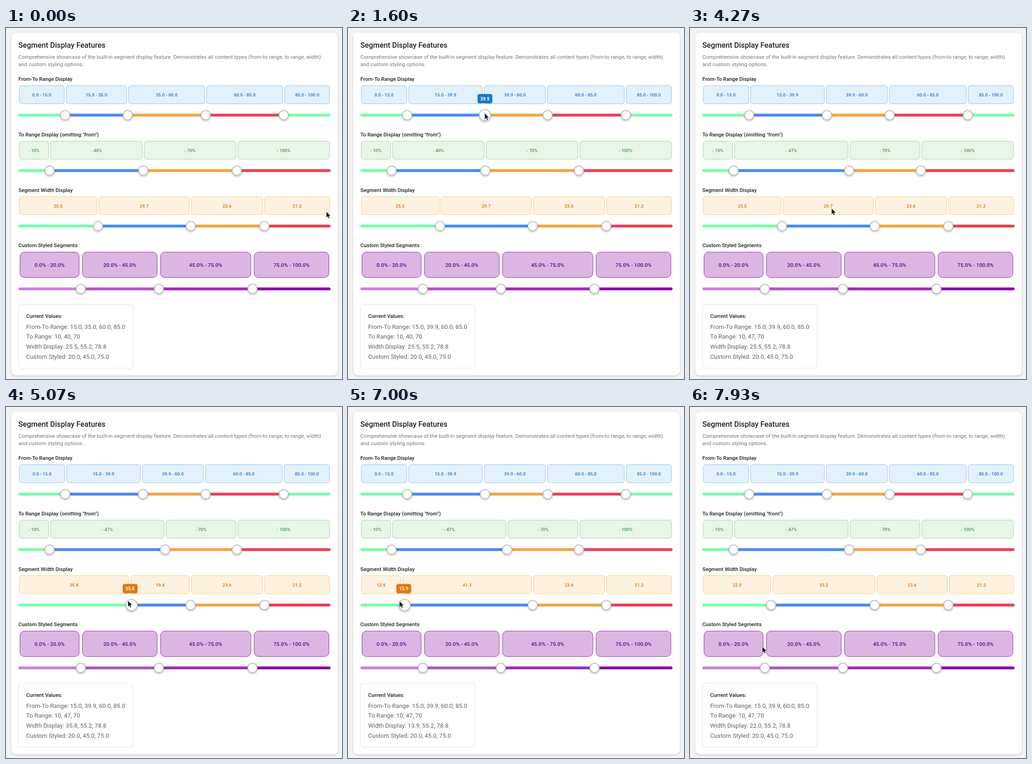
Recreate the animation shown at these times as an HTML page with a canvas. Size 733 by 764 pixels, loop 8 s.

```html
<!DOCTYPE html>
<html lang="en">
<head>
<meta charset="utf-8">
<title>Segment Display Features</title>
<style>
html, body { margin: 0; width: 100%; height: 100%; overflow: hidden; background: #f3f3f3; }
canvas { display: block; width: 733px; height: 764px; }
</style>
</head>
<body>
<canvas id="stage"></canvas>
<script>
const W = 733, H = 764, LOOP = 8000, LEFT = 27, SPAN = 681;
const THUMB_LAG = 6, CURSOR_LEAD = 35;
const canvas = document.getElementById('stage');
const ctx = canvas.getContext('2d');
const dpr = window.devicePixelRatio || 1;
canvas.width = W * dpr;
canvas.height = H * dpr;

const RAINBOW = ['#79fdad', '#4a8af4', '#f3a645', '#ec4058'];
const PURPLES = ['#c885d6', '#ad59c0', '#a02fb6', '#8b0ea2'];
const fixed = v => v.toFixed(1);
const toX = v => LEFT + v / 100 * SPAN;
const lerp = (a, b, u) => a + (b - a) * u;
const ease = (t, from, to) => {
  const u = Math.min(1, Math.max(0, (t - from) / (to - from)));
  return (1 - Math.cos(Math.PI * u)) / 2;
};

// `moving` is the index of the thumb that changes, `steps` its moves as {from, to, value}.
const sliders = [
  { title: 'From-To Range Display', name: 'From-To Range', digits: 1,
    values: [15, 35, 60, 85], moving: 1, steps: [{ from: 1070, to: 1530, value: 39.9 }],
    label: (a, b) => fixed(a) + ' - ' + fixed(b), colors: RAINBOW,
    fill: '#e3f1fb', edge: '#90c3ea', ink: '#2673c4', tip: '#1976d2' },
  { title: 'To Range Display (omitting "from")', name: 'To Range', digits: 0,
    values: [10, 40, 70], moving: 1, steps: [{ from: 3400, to: 3510, value: 47 }],
    label: (a, b) => '- ' + b + '%', colors: RAINBOW,
    fill: '#e8f5e8', edge: '#a3d4a6', ink: '#45974a' },
  { title: 'Segment Width Display', name: 'Width Display', digits: 1,
    values: [25.5, 55.2, 78.8], moving: 0, steps: [
      { from: 4670, to: 4930, value: 42 },
      { from: 4930, to: 5200, value: 30.5 },
      { from: 5400, to: 5670, value: 18.8 },
      { from: 6870, to: 7090, value: 11.2 },
      { from: 7130, to: 7600, value: 22 }],
    label: (a, b) => fixed(b - a), colors: RAINBOW,
    fill: '#fdf2df', edge: '#f1cc88', ink: '#dd6a12', tip: '#e8750c' },
  { title: 'Custom Styled Segments', name: 'Custom Styled', digits: 1,
    values: [20, 45, 75], moving: 0, steps: [], custom: true,
    label: (a, b) => fixed(a) + '% - ' + fixed(b) + '%', colors: PURPLES,
    fill: '#dcb6e3', edge: '#9527ad', ink: '#4a148c' }
];

// The cursor either travels to x, y or drags a slider's thumb.
const moves = [
  { from: 70, to: 730, x: 265, y: 186 },
  { from: 1070, to: 1730, drag: sliders[0] },
  { from: 1730, to: 2470, x: 221, y: 309 },
  { from: 2870, to: 3070, x: 349, y: 308 },
  { from: 4000, to: 4270, x: 309, y: 393 },
  { from: 4270, to: 4530, x: 211, y: 422 },
  { from: 4670, to: 5925, drag: sliders[2] },
  { from: 5760, to: 6070, x: 97, y: 433 },
  { from: 6270, to: 6730, x: 157, y: 423 },
  { from: 6870, to: 7710, drag: sliders[2] },
  { from: 7710, to: 7920, x: 158, y: 522 }
];

function valueAt(s, t) {
  return s.steps.reduce((v, m) => lerp(v, m.value, ease(t, m.from, m.to)), s.values[s.moving]);
}

function valuesAt(s, t) {
  return s.values.map((v, i) => i === s.moving ? valueAt(s, t) : v);
}

function cursorAt(t) {
  let x = 699, y = 400;
  for (const m of moves) {
    if (t < m.from) break;
    if (m.drag) {
      const now = valueAt(m.drag, Math.min(t + CURSOR_LEAD, m.to));
      x += toX(now) - toX(valueAt(m.drag, m.from));
    } else {
      const e = ease(t, m.from, m.to);
      x = lerp(x, m.x, e);
      y = lerp(y, m.y, e);
    }
  }
  return [x, y];
}

function text(str, x, y, size, color, weight = 400, align = 'left') {
  ctx.font = `${weight} ${size}px Roboto, sans-serif`;
  ctx.textAlign = align;
  ctx.fillStyle = color;
  ctx.fillText(str, x, y);
}

function box(x, y, w, h, r, fill, edge) {
  ctx.beginPath();
  ctx.roundRect(x, y, w, h, r);
  ctx.fillStyle = fill;
  ctx.fill();
  if (edge) {
    ctx.strokeStyle = edge;
    ctx.lineWidth = 1;
    ctx.stroke();
  }
}

function withShadow(alpha, blur, dy, paint) {
  ctx.save();
  ctx.shadowColor = `rgba(0,0,0,${alpha})`;
  ctx.shadowBlur = blur * dpr;
  ctx.shadowOffsetY = dy * dpr;
  paint();
  ctx.restore();
}

function disc(x, y, r, color) {
  ctx.beginPath();
  ctx.arc(x, y, r, 0, 2 * Math.PI);
  ctx.fillStyle = color;
  ctx.fill();
}

function thumb(x, y, grow) {
  const r = 11 + 2.3 * grow;
  withShadow(0.28, 4, 1.6, () => disc(x, y, r, '#c2c2c2'));
  disc(x, y, r - 1.9, '#fff');
}

function segments(s, stops, top, h) {
  // Box widths follow whole-number weights, so they drift slightly from the thumbs.
  const weights = stops.slice(1).map((v, i) => Math.floor(v - stops[i] + 1e-6));
  const total = weights.reduce((a, b) => a + b, 0);
  const gap = s.custom ? 3.6 : 2.1;
  let x = LEFT;
  weights.forEach((n, i) => {
    const w = n / total * SPAN;
    box(x + gap, top, w - 2 * gap, h, s.custom ? 9.5 : 5.2, s.fill, s.edge);
    text(s.label(stops[i], stops[i + 1]), x + w / 2, top + h / 2 + (s.custom ? 4.1 : 3.8),
      s.custom ? 11.5 : 9.8, s.ink, 500, 'center');
    x += w;
  });
}

function track(s, stops, y) {
  ctx.save();
  ctx.beginPath();
  ctx.roundRect(LEFT, y - 3.1, SPAN, 6.2, 3.1);
  ctx.clip();
  for (let i = 1; i < stops.length; i++) {
    ctx.fillStyle = s.colors[(i - 1) % s.colors.length];
    ctx.fillRect(toX(stops[i - 1]), y - 4, toX(stops[i]) - toX(stops[i - 1]) + 0.5, 8);
  }
  ctx.restore();
}

function tooltip(x, y, value, color) {
  withShadow(0.2, 3, 1, () => box(x - 16, y - 46, 32, 20, 4, color));
  text(fixed(value), x, y - 32.2, 10, '#fff', 700, 'center');
}

function slider(s, index, t) {
  const top = 125.5 + 120.75 * index, h = s.custom ? 55.4 : 39.4, y = top + h + 24.8;
  const values = valuesAt(s, t).map(v => +v.toFixed(s.digits));
  const shown = valuesAt(s, t - THUMB_LAG);
  const press = moves.find(m => m.drag === s && t >= m.from && t < m.to);
  const grow = press ? ease(t, press.from, press.from + 100) : 0;

  text(s.title, LEFT, top - 10.4, 11.45, '#212121', 500);
  segments(s, [0, ...values, 100], top, h);
  track(s, [0, ...shown, 100], y);
  shown.forEach((v, i) => thumb(toX(v), y, i === s.moving ? grow : 0));
  if (press) tooltip(toX(values[s.moving]), y, values[s.moving], s.tip);
  return s.name + ': ' + values.map(v => v.toFixed(s.digits)).join(', ');
}

function arrow(x, y) {
  const outline = new Path2D('M0 0V12.4L2.9 9.8L4.9 14.2L6.8 13.4L4.9 9H8.8Z');
  ctx.save();
  ctx.translate(x, y);
  ctx.lineJoin = 'round';
  ctx.strokeStyle = 'rgba(255,255,255,.85)';
  ctx.lineWidth = 1.3;
  ctx.stroke(outline);
  ctx.fillStyle = '#1c1c1c';
  ctx.fill(outline);
  ctx.restore();
}

function draw(t) {
  ctx.setTransform(dpr, 0, 0, dpr, 0, 0);
  ctx.fillStyle = '#f3f3f3';
  ctx.fillRect(0, 0, W, H);
  withShadow(0.25, 3, 1, () => box(11.3, 10, 712.7, 746.5, 10.5, '#fff'));

  text('Segment Display Features', LEFT, 42.5, 16.3, '#212121', 500);
  text('Comprehensive showcase of the built-in segment display feature. Demonstrates all ' +
    'content types (from-to range, to range, width)', LEFT, 67, 11.6, '#757575');
  text('and custom styling options.', LEFT, 83, 11.6, '#757575');

  const rows = sliders.map((s, i) => slider(s, i, t));
  box(27.4, 602, 249.7, 138.6, 5.5, '#fff', '#e0e0e0');
  text('Current Values:', 44, 630.8, 11.5, '#212121', 500);
  rows.forEach((row, i) => text(row, 44, 654.7 + i * 21.6, 13.2, '#616161'));

  arrow(...cursorAt(t));
}

const start = performance.now();
function tick() {
  draw((performance.now() - start) % LOOP);
  requestAnimationFrame(tick);
}
tick();
</script>
</body>
</html>
```
